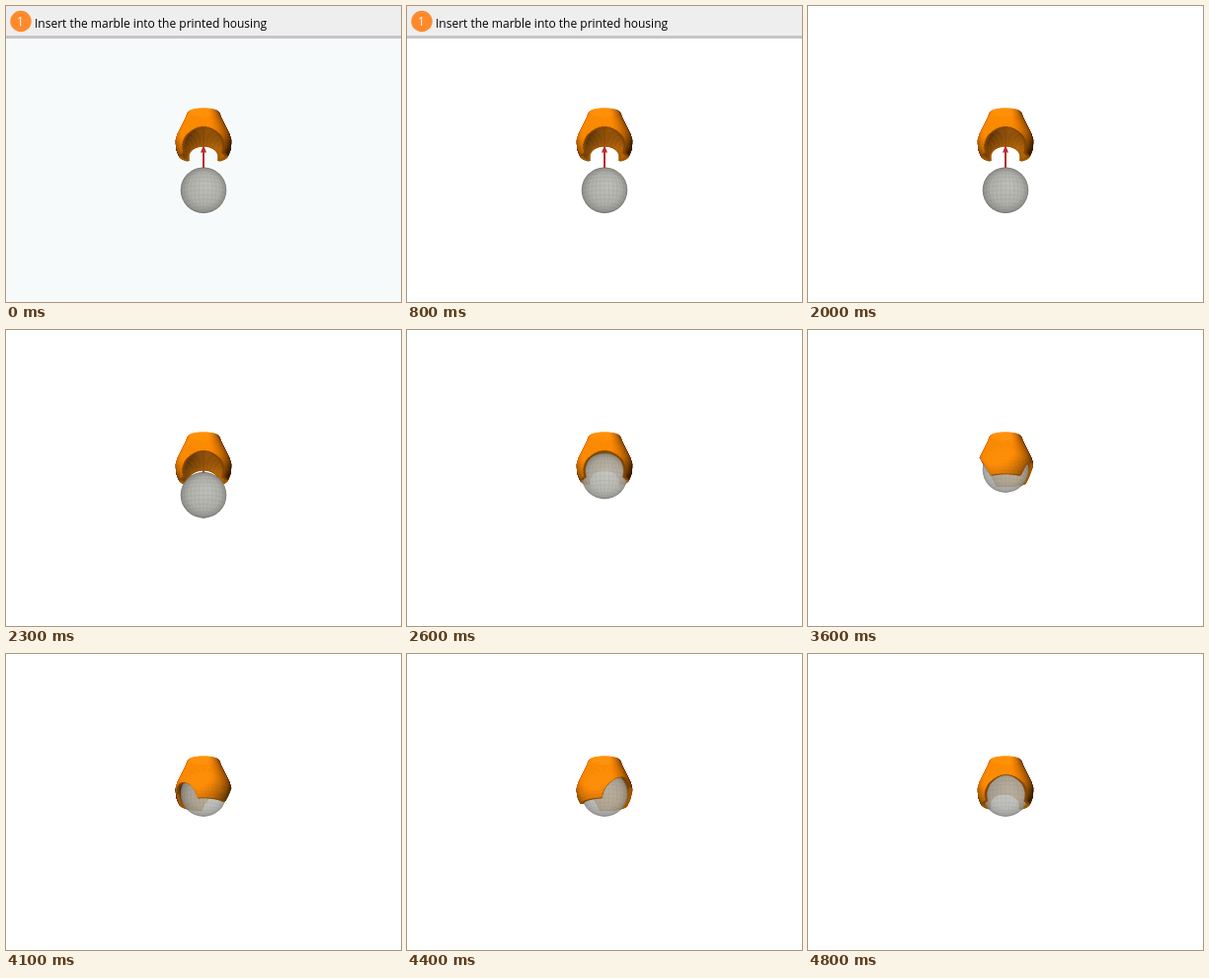
Animation, 400 px wide and 300 px high, one loop 4.9 s. Source, as an HTML page with a canvas:

```html
<!DOCTYPE html>
<html lang="en">
<head>
<meta charset="utf-8">
<title>Marble assembly</title>
<style>
html, body { margin: 0; width: 100%; height: 100%; overflow: hidden; background: #fff; }
canvas { display: block; width: 400px; height: 300px; }
</style>
</head>
<body>
<canvas id="stage" width="400" height="300"></canvas>
<script>
const ctx = document.getElementById('stage').getContext('2d');
const LOOP = 4900, TICK = 100, TAU = Math.PI * 2;
const CX = 200, TILT = 0.28, TOP = 108, TIP = 152, FRONT_BORE = 23, BACK_BORE = 17.5;
const BALL_R = 23.3, COLS = 120, ROWS = 14;
// Housing outline: height, radius
const OUTLINE = [[100, 14], [108, 15.5], [114, 18], [122, 22], [130, 26], [137, 28], [146, 27], [160, 21]];

const clamp = (v, a = 0, b = 1) => Math.min(b, Math.max(a, v));
const mix = (a, b, t) => a + (b - a) * t;
const progress = (t, from, to) => clamp((t - from) / (to - from));

function radius(y) {
  let i = 1;
  while (i < OUTLINE.length - 1 && y > OUTLINE[i][0]) i++;
  const [y0, r0] = OUTLINE[i - 1], [y1, r1] = OUTLINE[i];
  return mix(r0, r1, (y - y0) / (y1 - y0));
}

// Lower edge: a wide arch in front and a narrow one behind leave two prongs.
function edge(a) {
  const x = 27 * Math.sin(a);
  const bore = Math.cos(a) > 0 ? FRONT_BORE : BACK_BORE;
  return TIP - Math.sqrt(Math.max(0, bore * bore - x * x));
}

function project(a, y, inset = 0) {
  const r = radius(y) - inset;
  return [CX + r * Math.sin(a), y - r * Math.cos(a) * TILT];
}

function orange(light) {
  const l = clamp(light, 0.22, 1.03);
  return `rgb(${Math.min(255, 255 * l)},${138 * l},${4 * l})`;
}

function quad(points, color) {
  ctx.beginPath();
  points.forEach(([x, y]) => ctx.lineTo(x, y));
  ctx.closePath();
  ctx.fillStyle = ctx.strokeStyle = color;
  ctx.lineWidth = 0.5;
  ctx.fill();
  ctx.stroke();
}

function shade(a, y, inside) {
  const slope = (radius(y + 4) - radius(y - 4)) / 8;
  const n = Math.hypot(1, slope);
  const side = inside ? -1 : 1;
  const nx = side * Math.sin(a) / n, nz = side * Math.cos(a) / n, up = side * slope / n;
  const light = -0.3 * nx + 0.36 * up + 0.85 * nz;
  return inside ? 0.2 + 0.55 * light : 0.36 + 0.8 * light;
}

function housing(turn, front) {
  const step = TAU / COLS, columns = [];
  for (let i = 0; i < COLS; i++) {
    const a = i * step, view = a - turn, depth = Math.cos(view + step / 2);
    if ((depth > 0) === front) columns.push({ a, view, depth });
  }
  columns.sort((p, q) => p.depth - q.depth);
  for (const { a, view } of columns) {
    const e0 = edge(a), e1 = edge(a + step), next = view + step;
    const rim = () => quad(
      [project(view, e0), project(next, e1), project(next, e1, 3), project(view, e0, 3)],
      orange(front ? 0.5 : 0.62));
    if (front) rim();
    for (let j = 0; j < ROWS; j++) {
      const t = j / ROWS, u = (j + 1) / ROWS;
      quad([
        project(view, mix(TOP, e0, t)), project(next, mix(TOP, e1, t)),
        project(next, mix(TOP, e1, u)), project(view, mix(TOP, e0, u))
      ], orange(shade(view + step / 2, mix(TOP, (e0 + e1) / 2, (t + u) / 2), !front)));
    }
    if (!front) rim();
  }
}

function ball(y, alpha) {
  ctx.save();
  ctx.globalAlpha = alpha;
  const fill = ctx.createRadialGradient(CX + 3, y - 5, 3, CX, y, BALL_R);
  fill.addColorStop(0, '#bebeb9');
  fill.addColorStop(0.65, '#b0b0ab');
  fill.addColorStop(0.92, '#989893');
  fill.addColorStop(1, '#7e7e79');
  ctx.beginPath();
  ctx.arc(CX, y, BALL_R, 0, TAU);
  ctx.fillStyle = fill;
  ctx.fill();
  ctx.clip();
  // Faint mesh of latitudes and meridians
  ctx.strokeStyle = 'rgba(80,80,76,.14)';
  ctx.lineWidth = 0.6;
  for (let i = -7; i <= 7; i++) {
    const s = Math.sin(i * Math.PI / 16), w = BALL_R * Math.cos(i * Math.PI / 16);
    const start = i < 0 ? Math.PI / 2 : -Math.PI / 2;
    ctx.beginPath();
    ctx.ellipse(CX, y + BALL_R * s, w, w * 0.2, 0, Math.PI, TAU);
    ctx.stroke();
    ctx.beginPath();
    ctx.ellipse(CX, y, Math.abs(BALL_R * s), BALL_R, 0, start, start + Math.PI);
    ctx.stroke();
  }
  ctx.restore();
}

function arrow() {
  ctx.fillStyle = '#b92d2d';
  ctx.fillRect(199, 147, 2, 18);
  ctx.beginPath();
  ctx.moveTo(200, 141);
  ctx.lineTo(203, 148.5);
  ctx.lineTo(197, 148.5);
  ctx.fill();
}

function header() {
  ctx.fillStyle = '#eeeeee';
  ctx.fillRect(0, 0, 400, 30);
  ctx.fillStyle = '#c6c6c6';
  ctx.fillRect(0, 30, 400, 3);
  ctx.beginPath();
  ctx.arc(15, 15.5, 10.7, 0, TAU);
  ctx.fillStyle = '#ff8a2b';
  ctx.fill();
  ctx.textAlign = 'center';
  ctx.fillStyle = '#fff';
  ctx.font = '12px "Open Sans", "Noto Sans", sans-serif';
  ctx.fillText('1', 14.5, 20);
  ctx.textAlign = 'left';
  ctx.fillStyle = '#000';
  ctx.fillText('Insert the marble into the printed housing', 29, 22);
}

function draw(t) {
  const fade = progress(t, 0, 700);
  ctx.fillStyle = `rgb(${mix(246, 255, fade)},${mix(250, 255, fade)},${mix(251, 255, fade)})`;
  ctx.fillRect(0, 0, 400, 300);
  if (t < 2000) header();

  const lift = progress(t, 2000, 2700);
  const turn = Math.PI * (1 - Math.cos(Math.PI * progress(t, 2900, LOOP)));
  housing(turn, false);
  if (t < 2400) arrow();
  ball(mix(186.7, 141.5, lift), mix(1, 0.84, progress(lift, 0.6, 1)));
  housing(turn, true);
}

function frame(now) {
  draw(Math.floor((now % LOOP) / TICK) * TICK);
  requestAnimationFrame(frame);
}
draw(0);
requestAnimationFrame(frame);
</script>
</body>
</html>
```
